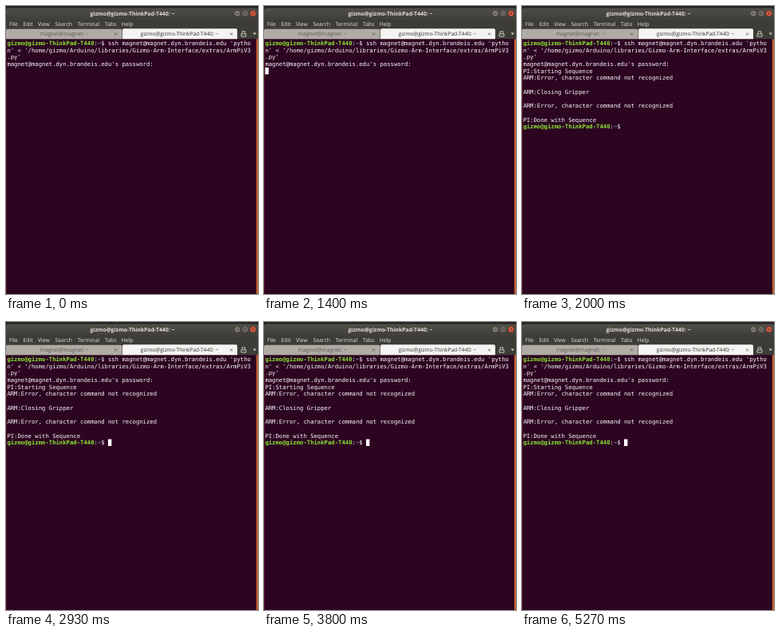
Animation of 316x360 px, one loop 5590 ms. Source, as an HTML page:

```html
<!DOCTYPE html>
<html lang="en">
<head>
<meta charset="utf-8">
<title>Terminal</title>
<style>
  html, body { margin: 0; width: 100%; height: 100%; overflow: hidden; background: #2c0521; }
  svg { display: block; width: 316px; height: 360px; }
  text { white-space: pre; text-rendering: geometricPrecision; }
  .ui { font-family: "Open Sans", "Noto Sans", sans-serif; font-size: 6.8px; fill: #e4e0d8; }
  .mid { text-anchor: middle; }
  .mono { font-family: "DejaVu Sans Mono", monospace; font-size: 7.25px; fill: #fbf8fa; }
  .user { fill: #8ae234; font-weight: bold; }
  .path { fill: #729fcf; font-weight: bold; }
</style>
</head>
<body>
<svg viewBox="0 0 316 360">
  <defs>
    <linearGradient id="bar" x2="0" y2="1">
      <stop offset="0" stop-color="#504e48"/>
      <stop offset="1" stop-color="#3f3e39"/>
    </linearGradient>
  </defs>

  <!-- title bar and menu -->
  <rect width="316" height="360" fill="#2c0521"/>
  <rect width="316" height="41.3" fill="#3d3c37"/>
  <rect width="316" height="4" fill="#262423"/>
  <path d="M0 17V6Q0 2.5 4 2.5H312Q316 2.5 316 6V17Z" fill="url(#bar)"/>
  <text class="ui mid" x="158.4" y="11.9" style="font-size:6.85px;font-weight:bold">gizmo@gizmo-ThinkPad-T440: ~</text>
  <g stroke="#34332f" stroke-width=".6">
    <circle cx="290.2" cy="9.3" r="3.8" fill="#807d76"/>
    <circle cx="299.9" cy="9.3" r="3.8" fill="#807d76"/>
    <circle cx="309.7" cy="9.3" r="3.8" fill="#e2573c"/>
  </g>
  <path d="M288.5 9.5h3.4M298.4 7.9h3v2.8h-3zM308.3 7.9l2.8 2.8m0-2.8l-2.8 2.8" fill="none" stroke="#3a3833" stroke-width=".8"/>
  <g id="menu"></g>

  <!-- tabs -->
  <path d="M0 41.3V30.5Q0 28.8 2 28.8H143.5Q145.5 28.8 145.5 30.5V41.3Z" fill="#b0aba5"/>
  <path d="M146 41.3V30Q146 28.2 148 28.2H288Q290 28.2 290 30V41.3Z" fill="#f6f4f2"/>
  <path d="M145.7 29.5v11.8" stroke="#7d7973" stroke-width=".6"/>
  <text class="ui mid" x="73.2" y="37.3" style="font-size:6.7px;fill:#5c5853">magnet@magnet: ~</text>
  <text class="ui mid" x="217.5" y="37.3" style="font-size:6.6px;fill:#2f2d2b">gizmo@gizmo-ThinkPad-T440: ~</text>
  <path d="M136 33.5l3 3m0-3l-3 3M281 33.5l3 3m0-3l-3 3" stroke="#5a5652" stroke-width=".8"/>
  <path d="M295 34.8h6v3.3h-6zM296.2 34.6v-2.8h3.6v2.8" fill="none" stroke="#d6d2ca" stroke-width=".9"/>
  <path d="M309.6 33.6h4.2l-2.1 2.6z" fill="#d6d2ca"/>

  <!-- window edges -->
  <rect y="41.3" width="1" height="318.7" fill="#540f26"/>
  <rect x="313.8" y="41.3" width="2.2" height="318.7" fill="#c4602f"/>

  <g id="before"></g>
  <g id="after"></g>
  <rect id="cursor" width="4.4" height="8.5" fill="#fff"/>
</svg>

<script>
const LOOP = 5590, BLINK = 600, FIRST_ON = 200, STEADY = 3800, OUTPUT = 1470;
const COL = 4.365, ROW = 8.7, LEFT = 1.4, TOP = 42.1;
const prompt = '<tspan class="user">gizmo@gizmo-ThinkPad-T440</tspan>:<tspan class="path">~</tspan>$ ';
const el = id => document.getElementById(id);

const menu = { File: 4, Edit: 21.5, View: 40, Search: 61.5, Terminal: 89.7, Tabs: 124, Help: 144.7 };
el('menu').innerHTML = Object.entries(menu)
  .map(([name, x]) => `<text class="ui" x="${x}" y="24.7">${name}</text>`).join('');

function print(id, first, lines) {
  el(id).innerHTML = lines.map((line, i) =>
    `<text class="mono" x="${LEFT}" y="${TOP + 6.8 + (first + i) * ROW}">${line}</text>`).join('');
}

print('before', 0, [
  prompt + "ssh magnet@magnet.dyn.brandeis.edu 'pytho",
  "n' &lt; '/home/gizmo/Arduino/libraries/Gizmo-Arm-Interface/extras/ArmPiV3",
  ".py'",
  "magnet@magnet.dyn.brandeis.edu's password:"
]);

const error = 'ARM:Error, character command not recognized';
print('after', 4, [
  'PI:Starting Sequence', error, '',
  'ARM:Closing Gripper', '', error, '',
  'PI:Done with Sequence', prompt
]);

function draw(t) {
  const done = t >= OUTPUT;
  const phase = Math.floor((t - FIRST_ON) / BLINK);
  const lit = t >= STEADY || (t >= FIRST_ON && phase % 2 === 0);
  const [col, row] = done ? [29, 12] : [0, 4];
  el('after').style.display = done ? '' : 'none';
  const cursor = el('cursor');
  cursor.style.display = lit ? '' : 'none';
  cursor.setAttribute('x', LEFT + col * COL);
  cursor.setAttribute('y', TOP + row * ROW);
}

const start = performance.now();
function tick() {
  draw((performance.now() - start) % LOOP);
  requestAnimationFrame(tick);
}
draw(0);
requestAnimationFrame(tick);
</script>
</body>
</html>
```
